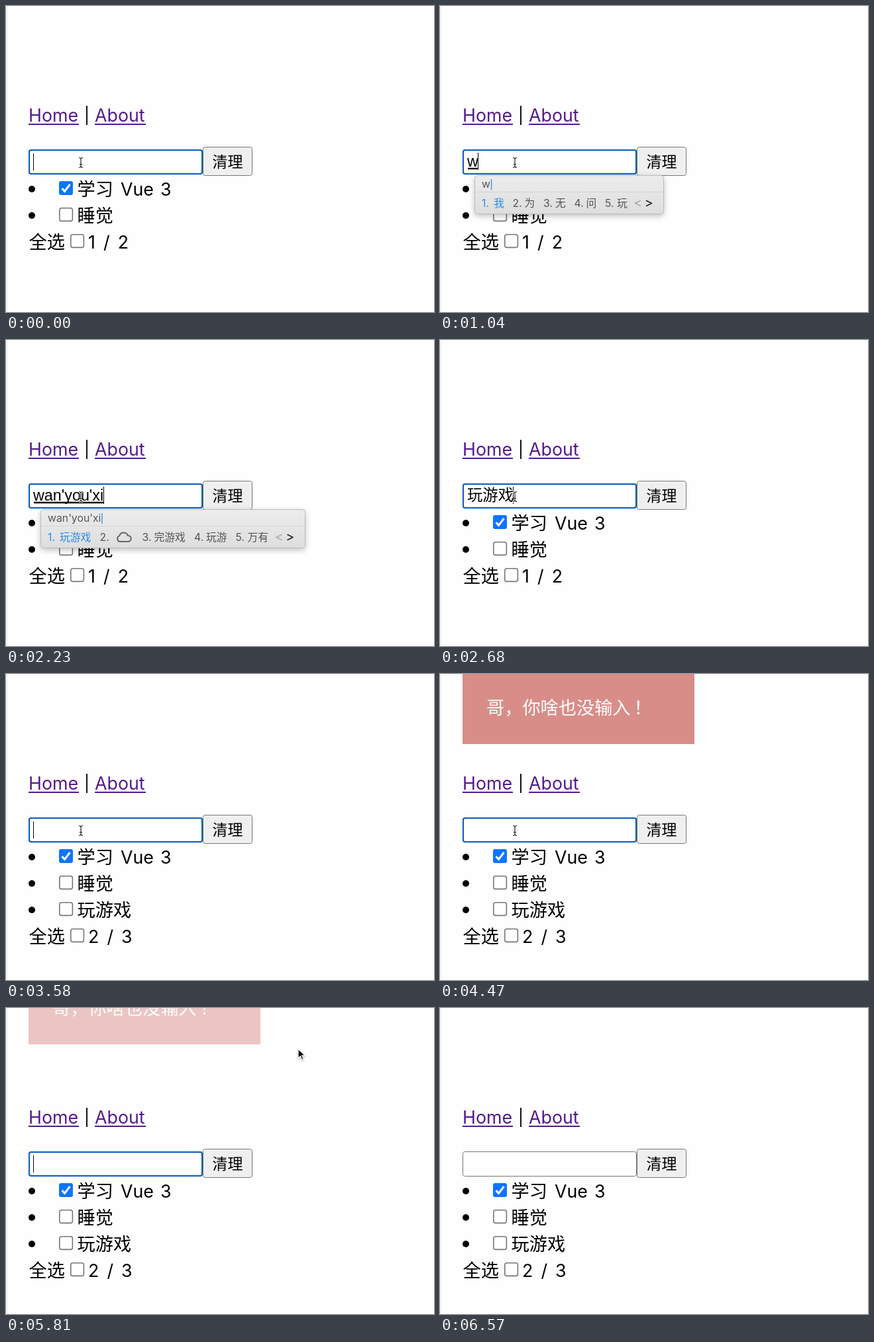
Recreate the animation shown at these times as an HTML page. Size 646 by 463 pixels, loop 6.67 s.

```html
<!DOCTYPE html>
<html lang="zh-CN">
<head>
<meta charset="utf-8">
<title>Todo</title>
<style>
  html, body { margin: 0; width: 100%; height: 100%; overflow: hidden; background: #fefefe; }
  svg { display: block; width: 646px; height: 463px; font: 27.2px Inter, "Noto Sans CJK SC", sans-serif; }
  text { white-space: pre; }
  .link { fill: #551a8b; font-size: 26.8px; }
  .field { font-family: "Liberation Sans", "Noto Sans CJK SC", sans-serif; font-size: 23.33px; }
  .ime { font-size: 15.8px; fill: #555; }
  .ime .pick { fill: #2f8ce4; }
  .latin { font-size: 26.8px; word-spacing: 2.5px; }
  #count { word-spacing: 4.5px; }
  .box { fill: #fff; stroke: #767676; stroke-width: 1.6; }
  .line { fill: none; stroke-width: 1.6; stroke-linecap: round; stroke-linejoin: round; }
  #popup { filter: drop-shadow(0 3px 4px rgba(0, 0, 0, .24)); }
</style>
</head>
<body>
<svg viewBox="0 0 646 463">
  <defs>
    <linearGradient id="panel" x2="0" y2="1">
      <stop stop-color="#ececec"/><stop offset="1" stop-color="#dedede"/>
    </linearGradient>
    <rect id="check" class="box" x=".8" y=".8" width="19.6" height="19.6" rx="3"/>
    <path id="beam" d="M-3 -7.5Q0 -7.5 0 -5Q0 -7.5 3 -7.5M0 -5V5M-3 7.5Q0 7.5 0 5Q0 7.5 3 7.5M-2 2.5H2"/>
  </defs>
  <rect width="646" height="463" fill="#fefefe"/>
  <rect width="3" height="463" fill="#f5f5f5"/>

  <g id="toast">
    <rect x="34" y="-20" width="350" height="128" fill="#d98b87"/>
    <text x="70" y="63" fill="#fff">哥，你啥也没输入<tspan dx="5">！</tspan></text>
  </g>

  <text class="link" x="34" y="175">Home</text>
  <text class="link" x="134" y="175">About</text>
  <path d="M34 179H110M134 179H211" stroke="#551a8b" stroke-width="2"/>
  <path d="M122 151V180" stroke="#111" stroke-width="2"/>

  <rect id="blurred" x="34.5" y="217.5" width="262" height="37" rx="3" fill="#fff" stroke="#767676"/>
  <rect id="focused" x="35" y="218" width="261" height="36" rx="3" fill="#fff" stroke="#095cbd" stroke-width="2"/>
  <rect x="297.5" y="213.5" width="74" height="43" rx="3" fill="#efefef" stroke="#767676"/>
  <text x="311.5" y="243.7" font-size="23">清理</text>

  <circle cx="39" cy="277" r="5"/>
  <rect x="80" y="265" width="21" height="21" rx="3" fill="#0d75ff"/>
  <path d="M84.5 276L88.5 280.5L96.5 270" fill="none" stroke="#fff" stroke-width="3"/>
  <text x="107.5" y="287">学习</text>
  <text class="latin" x="173" y="287">Vue 3</text>

  <circle cx="39" cy="317" r="5"/>
  <use href="#check" x="80" y="305"/>
  <text x="107.5" y="327">睡觉</text>

  <g id="newItem">
    <circle cx="39" cy="357" r="5"/>
    <use href="#check" x="80" y="345"/>
    <text x="107.5" y="367">玩游戏</text>
  </g>

  <g id="summary">
    <text x="34.5" y="367">全选</text>
    <use href="#check" x="97" y="345"/>
    <text id="count" class="latin" x="124" y="367"></text>
  </g>

  <text id="typed" class="field" x="41" y="243"></text>
  <path id="underline" stroke="#000" stroke-width="2.4"/>
  <rect id="caret" y="223" width="1" height="26"/>

  <g id="popup">
    <rect id="frame" x="52.5" y="256.5" height="58" rx="4" fill="url(#panel)" stroke="#bcbcbc"/>
    <path id="divider" stroke="#d4d4d4"/>
    <text id="pinyin" class="ime" x="63" y="274.5"></text>
    <rect id="imeCaret" y="262" width="1.3" height="16" fill="#2f8ce4"/>
    <g id="choices" class="ime"></g>
    <g id="arrows" class="line">
      <path d="M8 294.5L0 298.5L8 302.5" stroke="#aaa"/>
      <path d="M17 294.5L25 298.5L17 302.5" stroke="#222"/>
    </g>
  </g>

  <g id="ibeam" fill="none">
    <use href="#beam" stroke="#fff" stroke-width="3"/>
    <use href="#beam" stroke="#222" stroke-width="1.2"/>
  </g>
  <path id="arrow" d="M0 0V14L3.4 10.8L5.8 16.3L8.2 15.2L5.8 9.9H10.3Z" stroke="#fff" stroke-width="1.2"
    style="filter:drop-shadow(0 1px 1px rgba(0,0,0,.35))"/>
</svg>
<script>
const LOOP = 6670;
const CLOUD = "☁";
const CLOUD_PATH = "M5 14.5A4.9 4.9 0 0 1 5.2 5.6A6.7 6.7 0 0 1 17.8 5.4A4.6 4.6 0 0 1 19 14.5Z";
const el = {};
document.querySelectorAll("svg [id]").forEach(node => el[node.id] = node);

const ime = (text, words) => ({ text, words: words.split(" "), caret: 1 });
const moveTo = (x, y, shape = "arrow") => ({ x, y, shape });

// Each entry changes only the listed parts of the scene.
const timeline = [
  [0, { text: "", words: null, caret: 1, focus: 1, items: 2, ...moveTo(113, 237, "ibeam") }],
  [150, { caret: 0 }],
  [600, { caret: 1 }],
  [1040, ime("w", "我 为 无 问 玩")],
  [1190, ime("wa", "哇 挖 娃 瓦 蛙")],
  [1340, ime("wan", "万 玩 完 晚 碗")],
  [1790, ime("wan'y", "万一 玩意 万元 玩呀 晚宴")],
  [1940, ime("wan'yo", "玩哟 万有 玩游 晚有 完哟")],
  [2090, ime("wan'you", "万有 玩游 玩友 晚有 完有")],
  [2230, ime("wan'you'xi", `玩游戏 ${CLOUD} 完游戏 玩游 万有`)],
  [2680, { text: "玩游戏", words: null }],
  [2980, { text: "", items: 3 }],
  [3130, { caret: 0 }],
  [3580, { caret: 1 }],
  [4180, { caret: 0 }],
  [4330, {}],
  [4470, {}],
  [4620, { caret: 1 }],
  [5070, { caret: 0 }],
  [5370, moveTo(168, 229, "ibeam")],
  [5520, { caret: 1, ...moveTo(318, 198) }],
  [5670, moveTo(413.5, 158.5)],
  [5810, moveTo(441, 62)],
  [5960, { shape: "" }],
  [6110, { caret: 0 }],
  [6570, { focus: 0 }],
];

const hidden = { opacity: 0, transform: "translateY(-103px)" };
const shown = { opacity: 1, transform: "none" };
const key = (time, pose, easing = "linear") => ({ ...pose, easing, offset: time / LOOP });
const toastMotion = el.toast.animate([
  key(0, hidden), key(4220, hidden, "ease"), key(4520, shown),
  key(5720, shown, "ease"), key(6020, hidden), key(LOOP, hidden),
], { duration: LOOP, fill: "both" });
toastMotion.pause();

function set(node, attrs) {
  for (const name in attrs) node.setAttribute(name, attrs[name]);
}

function show(node, visible) {
  node.style.display = visible ? "" : "none";
}

function add(parent, tag, attrs, text = "") {
  const node = document.createElementNS("http://www.w3.org/2000/svg", tag);
  set(node, attrs);
  node.textContent = text;
  parent.append(node);
}

function drawPopup({ text, words }) {
  el.pinyin.textContent = text;
  set(el.imeCaret, { x: 64 + el.pinyin.getComputedTextLength() });
  el.choices.replaceChildren();
  let x = 63;
  words.forEach((word, i) => {
    const pick = i ? "" : "pick";
    add(el.choices, "text", { class: pick, x, y: 304 }, `${i + 1}.`);
    if (word === CLOUD) {
      add(el.choices, "path", {
        d: CLOUD_PATH, transform: `translate(${x + 24.5} 290.5)`,
        fill: "none", stroke: "#666", "stroke-width": 2,
      });
      x += 64;
    } else {
      add(el.choices, "text", { class: pick, x: x + 18, y: 304 }, word);
      x += 30.5 + 16 * word.length;
    }
  });
  const right = Math.floor(x + 42);
  set(el.arrows, { transform: `translate(${x - 1} 0)` });
  set(el.frame, { width: right - 52 });
  set(el.divider, { d: `M53 281.5H${right}` });
}

function draw(state) {
  const { text, words, caret, focus, items, x, y, shape } = state;
  el.typed.textContent = text;
  const end = Math.floor(41 + (text ? el.typed.getComputedTextLength() : 0));
  set(el.caret, { x: end, y: text ? 222 : 223 });
  set(el.underline, { d: `M42 246H${end}` });
  show(el.caret, caret);
  show(el.underline, words);
  show(el.focused, focus);
  show(el.popup, words);
  if (words) drawPopup(state);

  show(el.newItem, items === 3);
  set(el.summary, { transform: `translate(0 ${(items - 2) * 40})` });
  el.count.textContent = `${items - 1} / ${items}`;

  for (const name of ["ibeam", "arrow"]) {
    show(el[name], shape === name);
    set(el[name], { transform: `translate(${x} ${y})` });
  }
}

let state = {};
const scenes = timeline.map(([time, change]) => ({ time, state: state = { ...state, ...change } }));
const start = performance.now();
let current;

function tick() {
  const time = Math.max(0, performance.now() - start) % LOOP;
  const scene = scenes.findLast(s => s.time <= time);
  if (scene !== current) {
    current = scene;
    draw(scene.state);
    toastMotion.currentTime = scene.time;
  }
  requestAnimationFrame(tick);
}
tick();
</script>
</body>
</html>
```
